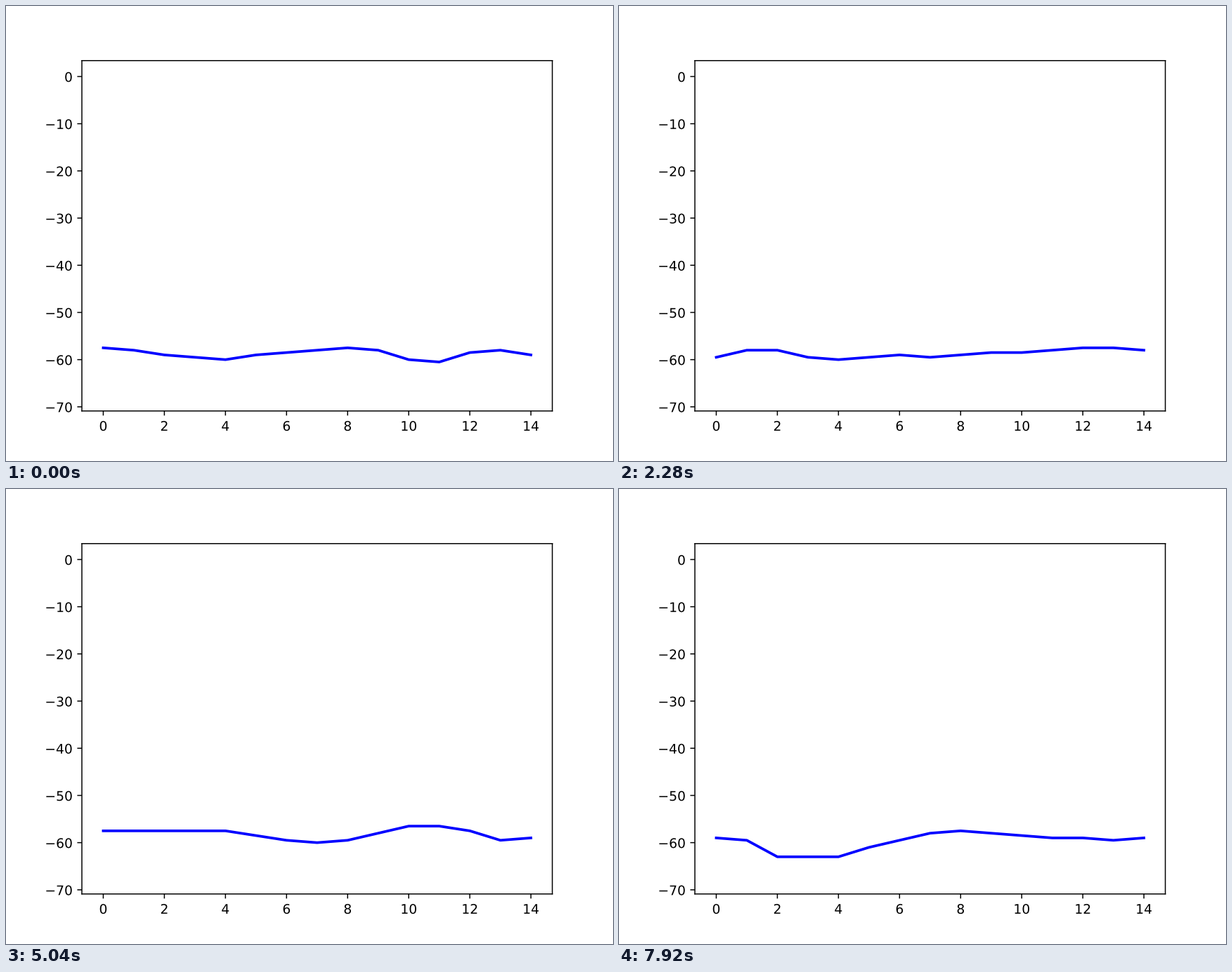
A matplotlib script that plays this animation: 864 px wide and 648 px high, repeating every 8000 ms.

```python
import numpy as np
import matplotlib.pyplot as plt
from matplotlib.animation import FuncAnimation
from matplotlib.patheffects import Normal

WINDOW = 15          # samples visible at once
TICK = 40            # ms per drawn frame
TICKS_PER_STEP = 3   # the window moves one sample every 120 ms
FRAMES = 200
REST = -57.5

# Triangular dips below the resting level: centre, depth, half width
DIPS = [
    (3.8, 2.4, 4), (10.6, 3.5, 1.9), (14.3, 1.6, 1.8), (18.6, 2.3, 1.9),
    (22.6, 1.9, 2.2), (26, 1.9, 5.5), (36, 1.1, 5), (38, 3.3, 1.2),
    (48.9, 2.8, 3), (52.6, -1.4, 2), (55.4, 2.5, 1.6), (57.9, 2, 1.5),
    (61.5, 3.4, 2.8), (65.4, 1.8, 2), (68.1, 3.7, 1.8), (70, 5.3, 3.2),
    (79, 2, 5.5),
]


def level(i):
    """Signal level at sample i, read in steps of one half."""
    drop = sum(d * np.maximum(0, 1 - np.abs(i - c) / w) for c, d, w in DIPS)
    return np.round(2 * (REST - drop)) / 2


def style_axes(ax):
    """Fixed limits, with frame, ticks and labels at sub-pixel positions."""
    ax.set_xlim(-0.7, 14.7)
    ax.set_ylim(-70.875, 3.375)
    ax.set_xticks(range(0, 15, 2))
    ax.set_yticks(range(-70, 1, 10))
    ax.tick_params(length=0, pad=7)
    for spine in ax.spines.values():
        spine.set_snap(False)
    for label in ax.get_xticklabels() + ax.get_yticklabels():
        label.set_path_effects([Normal()])

    box = ax.get_window_extent()
    length = 3.5 * ax.figure.dpi / 72
    mark = dict(color="black", lw=0.8, snap=False, clip_on=False,
                solid_capstyle="butt")
    for x in ax.get_xticks():
        ax.plot([x, x], [0, -length / box.height],
                transform=ax.get_xaxis_transform(), **mark)
    for y in ax.get_yticks():
        ax.plot([0, -length / box.width], [y, y],
                transform=ax.get_yaxis_transform(), **mark)


plt.rcParams["font.family"] = "DejaVu Sans"
fig, ax = plt.subplots(figsize=(6.4, 4.8), dpi=135)
style_axes(ax)
xs = np.arange(WINDOW)
line, = ax.plot(xs, level(xs), color="blue", lw=2)


def update(frame):
    line.set_ydata(level(xs + frame // TICKS_PER_STEP))
    return line,


anim = FuncAnimation(fig, update, frames=FRAMES, interval=TICK,
                     repeat=True, repeat_delay=0)
plt.show()
```
